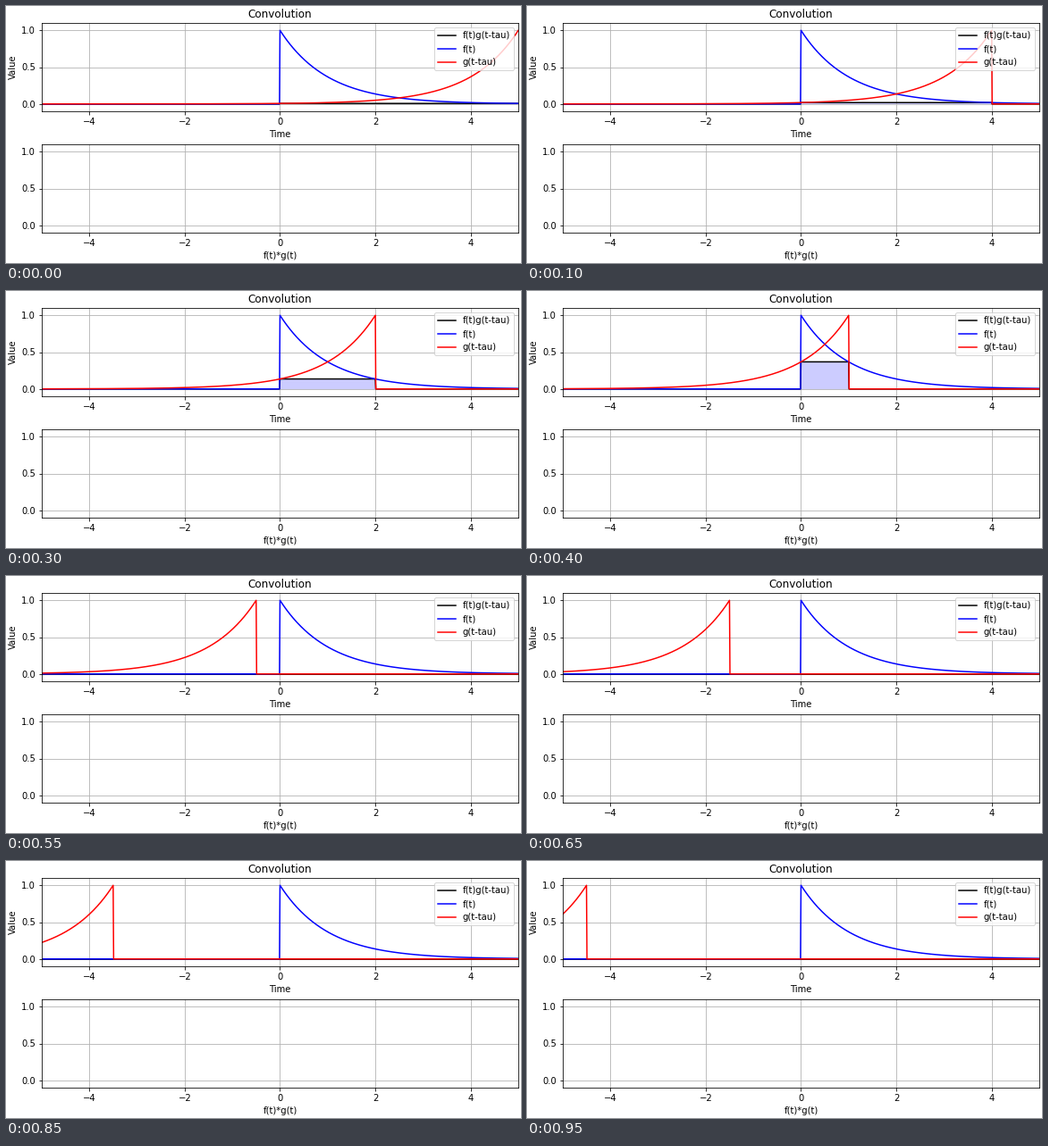
Animation of 576 by 288 pixels, one loop 1000 ms. Source, as a matplotlib script:

```python
import numpy as np
import matplotlib.pyplot as plt
from matplotlib.animation import FuncAnimation

WIDTH, HEIGHT, DPI = 576, 288, 72
FRAMES, INTERVAL = 20, 50
SPAN = 5
SHIFT_STEP = 2 * SPAN / FRAMES

plt.rcParams["font.family"] = "DejaVu Sans"
plt.rcParams["font.size"] = 10

time = np.linspace(-SPAN, SPAN, 1001)


def decay(t):
    """One-sided exponential, tolerant of rounding at the step."""
    return np.where(t > -1e-9, np.exp(-np.maximum(t, 0)), 0)


fig, axes = plt.subplots(2, 1, figsize=(WIDTH / DPI, HEIGHT / DPI), dpi=DPI,
                         layout="constrained")
for ax, xlabel in zip(axes, ("Time", "f(t)*g(t)")):
    ax.set(xlim=(-SPAN, SPAN), ylim=(-0.1, 1.1), xlabel=xlabel,
           xticks=range(-4, 5, 2), yticks=(0, 0.5, 1))
    ax.grid(True)

signals = axes[0]
signals.set_title("Convolution")
signals.set_ylabel("Value")

f = decay(time)
product_line, = signals.plot(time, 0 * time, color="black", label="f(t)g(t-tau)")
signals.plot(time, f, color="blue", label="f(t)")
g_line, = signals.plot(time, 0 * time, color="red", label="g(t-tau)")
area = signals.fill_between(time, 0 * time, color="blue", alpha=0.2, linewidth=0)
signals.legend(loc="upper right")


def update(frame):
    shift = SPAN - SHIFT_STEP * frame
    g = decay(shift - time)
    product = f * g
    g_line.set_ydata(g)
    product_line.set_ydata(product)
    outline = np.column_stack([time, product])
    area.set_verts([np.vstack([[-SPAN, 0], outline, [SPAN, 0]])])
    return product_line, g_line, area


animation = FuncAnimation(fig, update, frames=FRAMES, interval=INTERVAL,
                          repeat=True, repeat_delay=0)
plt.show()
```
